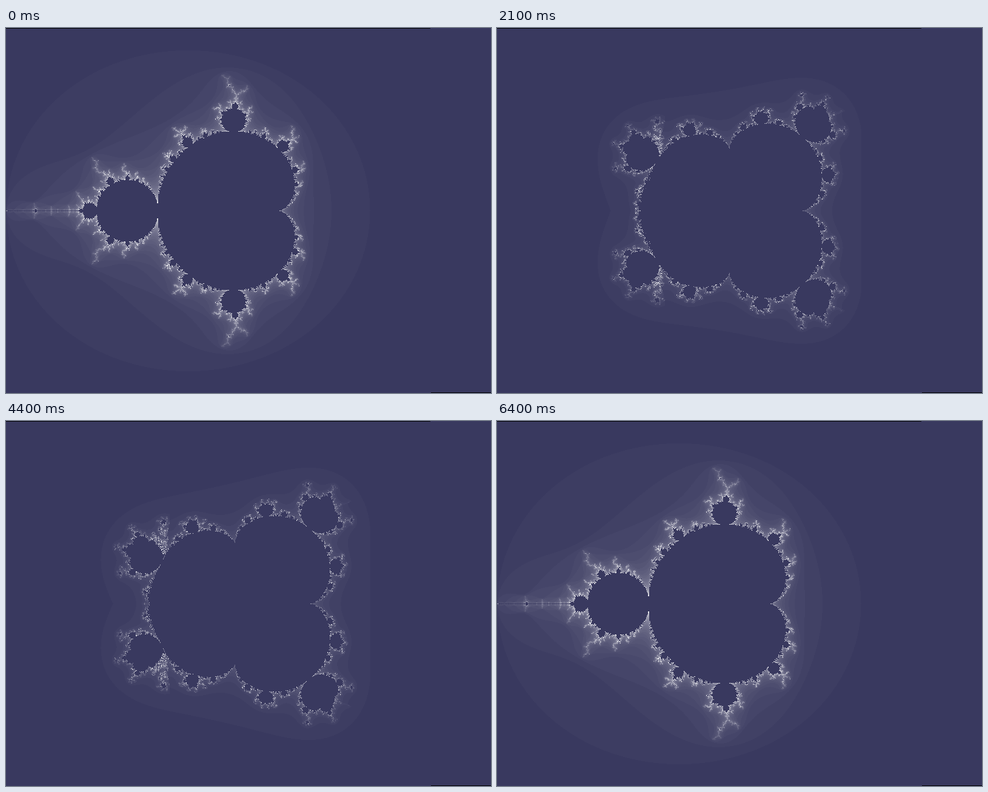
An HTML page with a canvas for the animation above (6.5 s loop, 800 by 602 pixels).

```html
<!DOCTYPE html>
<html lang="en">
<head>
<meta charset="utf-8">
<title>Multibrot set, exponent 2 to 6</title>
<style>
  html, body { margin: 0; width: 100%; height: 100%; overflow: hidden; background: #39395f; }
  canvas { display: block; width: 800px; height: 602px; }
</style>
</head>
<body>
<canvas id="stage" width="800" height="602"></canvas>
<script>
const W = 800, H = 602, MID = 301, COLS = 601;
const STEP = 0.005, LIMIT = 50;
const FRAME_MS = 100, LOOP_MS = 6500, PEAK = 32;
const BASE = [57, 57, 95], BRIGHT = [255, 255, 255];

const ctx = document.getElementById('stage').getContext('2d');
const image = ctx.createImageData(W, H);
const pixels = new Uint32Array(image.data.buffer);
const BLACK = 0xff000000;

const palette = Uint32Array.from({ length: LIMIT }, (_, n) => {
  const [r, g, b] = BASE.map((v, i) => Math.round(v + (BRIGHT[i] - v) * n / LIMIT));
  return (BLACK | b << 16 | g << 8 | r) >>> 0;
});

// Steps of z -> z^p + c before |z| > 2; 0 for points that stay bounded.
function escape(cx, cy, p) {
  let x = cx, y = cy;
  for (let n = 0; n < LIMIT; n++) {
    const r = Math.pow(x * x + y * y, p / 2);
    const a = p * Math.atan2(y, x);
    const nx = r * Math.cos(a) + cx, ny = r * Math.sin(a) + cy;
    if (nx * nx + ny * ny > 4) return n;
    const dx = nx - x, dy = ny - y;
    if (dx * dx + dy * dy < 1e-7) return 0;
    x = nx;
    y = ny;
  }
  return 0;
}

// Upper half of the plane; the lower half is its mirror image.
function computeHalf(p) {
  const counts = new Uint8Array(W * MID);
  const core = (p - 1) * Math.pow(p, -p / (p - 1));
  for (let row = 0; row < MID; row++) {
    const cy = row * STEP;
    for (let col = 0; col < COLS; col++) {
      const cx = (col - 400) * STEP;
      if (cx * cx + cy * cy > core * core) counts[row * W + col] = escape(cx, cy, p);
    }
  }
  return counts;
}

const cache = [];
const getHalf = k => cache[k] || (cache[k] = computeHalf(2 + k / 8));

function paint(k) {
  const counts = getHalf(k);
  pixels.fill(palette[0]);
  for (let row = 0; row < MID; row++) {
    const up = (MID - row) * W, down = (MID + row) * W;
    for (let col = 0; col < COLS; col++) {
      pixels[up + col] = pixels[down + col] = palette[counts[row * W + col]];
    }
  }
  pixels.fill(BLACK, 0, 700);
  pixels.fill(BLACK, W * H - 99);
  ctx.putImageData(image, 0, 0);
}

let shown = -1;
function tick() {
  const frame = Math.floor(performance.now() % LOOP_MS / FRAME_MS);
  const k = PEAK - Math.abs(frame - PEAK);
  if (k !== shown) {
    paint(k);
    shown = k;
  } else if (k < PEAK) {
    getHalf(k + 1);
  }
  requestAnimationFrame(tick);
}
tick();
</script>
</body>
</html>
```
